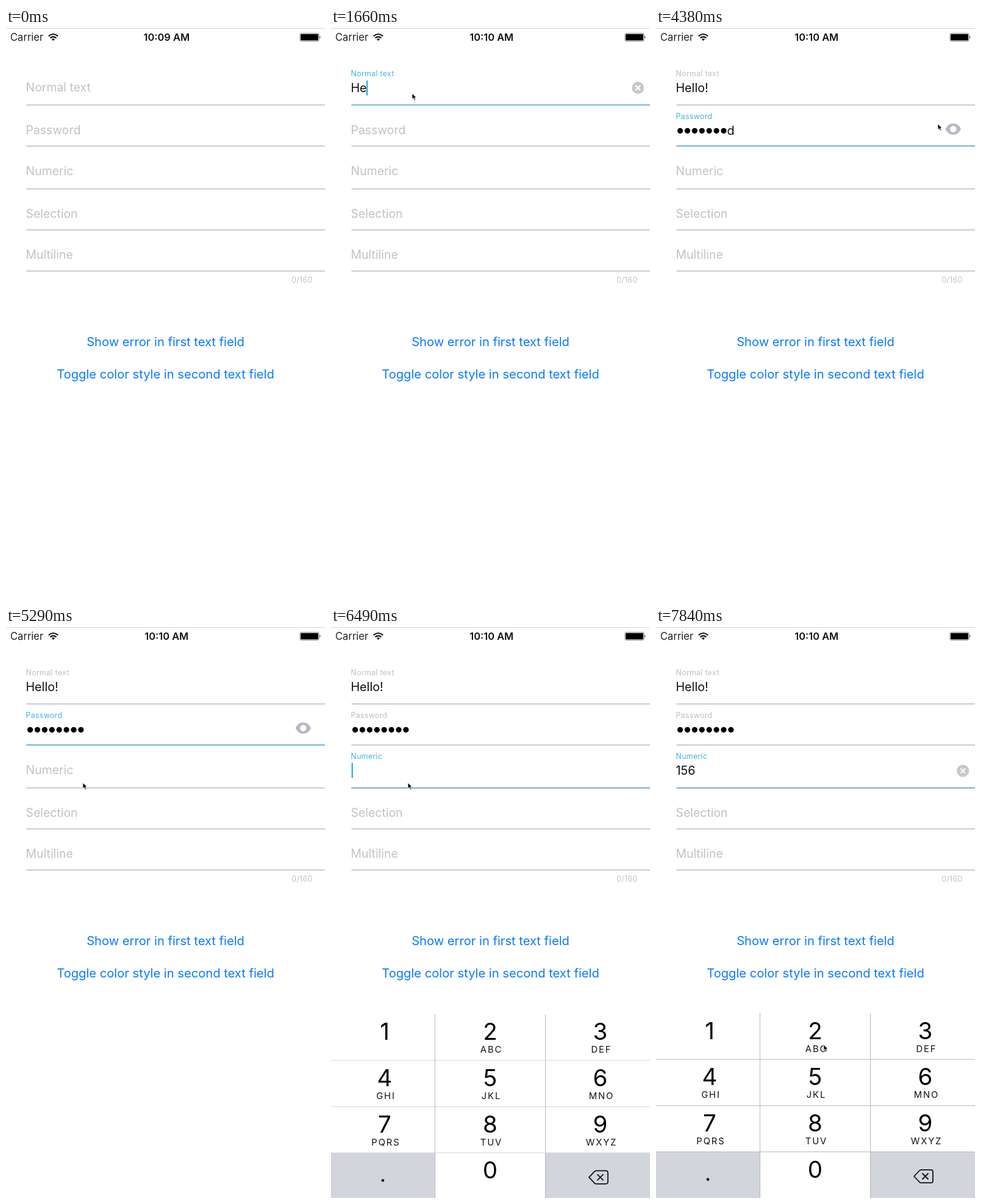
Recreate the animation shown at these times as an HTML page. Size 523 by 935 pixels, loop 7.99 s.

```html
<!DOCTYPE html>
<html lang="en">
<head>
<meta charset="utf-8">
<title>Animated text fields</title>
<style>
  html, body { margin: 0; width: 100%; height: 100%; overflow: hidden; background: #fff; }
  svg { display: block; width: 523px; height: 935px; }
  text { font-family: Inter, Roboto, sans-serif; white-space: pre; }
</style>
</head>
<body>
<svg id="stage" viewBox="0 0 523 935"></svg>
<script>
const LOOP = 7990, STEP = 150;
const GREY = '#c2c2c4', FLOAT_GREY = '#babfc6', RULE = '#b6b6b8';
const BLUE = '#42b3e5', LINK = '#0a7aff', ICON = '#c7c7cb';
const stage = document.getElementById('stage');

function add(tag, attrs, parent = stage) {
  const el = document.createElementNS('http://www.w3.org/2000/svg', tag);
  set(el, attrs);
  parent.appendChild(el);
  return el;
}
function set(el, attrs) {
  for (const k in attrs) el.setAttribute(k, attrs[k]);
}
function label(text, x, y, size, fill, extra = {}, parent = stage) {
  const el = add('text', { x, y, 'font-size': size, fill, ...extra }, parent);
  el.textContent = text;
  return el;
}
const show = (el, on) => set(el, { visibility: on ? 'visible' : 'hidden' });
const clamp = v => Math.max(0, Math.min(1, v));
const mix = (a, b, p) => a + (b - a) * p;
const easeOut = p => 1 - (1 - p) ** 2;
const within = (t, a, b) => t >= a && t < b;

function mixColor(a, b, p) {
  const part = (c, i) => parseInt(c.slice(i, i + 2), 16);
  return `rgb(${[1, 3, 5].map(i => Math.round(mix(part(a, i), part(b, i), p)))})`;
}

// Status bar
add('rect', { width: 523, height: 935, fill: '#fff' });
add('rect', { width: 523, height: 1, fill: '#d3d3d3' });
label('Carrier', 7, 21, 16.6, '#222');
const clock = label('', 263.3, 21, 16.4, '#111', { 'text-anchor': 'middle', 'font-weight': 600 });
const wifi = add('g', { fill: 'none', stroke: '#111', 'stroke-width': 2.1 });
add('path', { d: 'M69.8 13.4Q77.5 6.6 85.2 13.4' }, wifi);
add('path', { d: 'M72.6 16.4Q77.5 12.2 82.4 16.4' }, wifi);
add('path', { d: 'M77.5 21L74.8 18.3Q77.5 16.2 80.2 18.3Z', fill: '#111', stroke: 'none' }, wifi);
add('rect', { x: 482, y: 8.8, width: 31, height: 12.6, rx: 2, fill: '#fff', stroke: '#555', 'stroke-width': 0.8 });
add('rect', { x: 483.2, y: 10, width: 28.6, height: 10.2, rx: 1, fill: '#000' });
add('path', { d: 'M514.3 12.8Q516.6 15 514.3 17.4Z', fill: '#222' });

// Fields: focus and blur times in ms; those without a focus time stay idle
const fields = [
  { name: 'Normal text', rule: 126, base: 104, top: 78.5, focus: 910, blur: 2570, blue: '#48b5e7' },
  { name: 'Password', rule: 193.3, base: 174, top: 148.6, focus: 2570, blur: 5590, blue: '#459fd6' },
  { name: 'Numeric', rule: 263.5, base: 241, top: 215.8, focus: 5590, blur: Infinity, blue: '#5595c6' },
  { name: 'Selection', rule: 330.6, base: 311 },
  { name: 'Multiline', rule: 398, base: 378 }
];
for (const f of fields) {
  add('rect', { x: 33.5, y: f.rule - 0.7, width: 489.5, height: 1.4, fill: RULE });
  f.label = label(f.name, 32.6, f.base, 19.4, GREY);
  if (f.focus) {
    f.bar = add('rect', { x: 33.5, y: f.rule - 0.7, width: 0, height: 1.4, fill: f.blue });
    f.value = label('', 32.4, f.top + 26.6, 19.8, '#111');
  }
}
const [normal, password, numeric] = fields;

label('0/160', 502.5, 417.3, 12.4, GREY, { 'text-anchor': 'end', 'letter-spacing': 0.3 });
label('Show error in first text field', 261.5, 521, 20.15, LINK, { 'text-anchor': 'middle' });
label('Toggle color style in second text field', 261.5, 574, 20.15, LINK, { 'text-anchor': 'middle' });

const dots = Array.from({ length: 8 }, (_, i) =>
  add('circle', { cx: 39.6 + 11.9 * i, cy: 168.3, r: 4.6, fill: '#000' }));

const caret = add('rect', { width: 2.5, height: 24, fill: '#3aaee2' });

function clearButton(y) {
  const g = add('g', { transform: `translate(503.2 ${y})` });
  add('circle', { r: 10, fill: ICON }, g);
  add('path', { d: 'M-4 -4L4 4M4 -4L-4 4', stroke: '#fff', 'stroke-width': 2 }, g);
  return g;
}
const clearNormal = clearButton(98), clearNumeric = clearButton(235.5);

const eye = add('g', { transform: 'translate(487.3 165.5)' });
add('path', { d: 'M-12.7 0C-7 -12.4 7 -12.4 12.7 0C7 12.4 -7 12.4 -12.7 0Z', fill: '#b5b9c1' }, eye);
add('circle', { r: 5.2, fill: '#fff' }, eye);

// Number pad, drawn at its resting place and shifted down while it slides in
const pad = add('g', {});
const TOP = 632.3, ROW = 75.7, COLS = [0, 170.5, 351.5, 523], MIDS = [88, 261, 441.5];
const cell = (col, row, fill) => add('rect', {
  x: COLS[col], y: TOP + row * ROW, width: COLS[col + 1] - COLS[col], height: ROW + 0.5, fill
}, pad);
add('rect', { y: TOP, width: 523, height: 310, fill: '#fff' }, pad);
cell(0, 3, '#d2d5dc');
cell(2, 3, '#d2d5dc');
const pressed = cell(0, 0, '#d2d5dc');
for (const x of [COLS[1], COLS[2]])
  add('rect', { x: x - 0.5, y: TOP, width: 1, height: 310, fill: '#b3b5ba' }, pad);
const padRules = [1, 2, 3].map(i =>
  add('rect', { y: TOP + i * ROW - 0.5, width: 523, height: 1, fill: '#b3b5ba' }, pad));
const digit = (n, col, row) => label(n, MIDS[col], TOP + row * ROW + 42.2, 38.5, '#000',
  { 'text-anchor': 'middle' }, pad);
['', 'ABC', 'DEF', 'GHI', 'JKL', 'MNO', 'PQRS', 'TUV', 'WXYZ'].forEach((letters, i) => {
  const col = i % 3, row = Math.floor(i / 3);
  digit(i + 1, col, row);
  label(letters, MIDS[col] + 2, TOP + row * ROW + 63.4, 14.8, '#111',
    { 'text-anchor': 'middle', 'letter-spacing': 1.9 }, pad);
});
digit(0, 1, 3);
add('circle', { cx: 85, cy: 904.6, r: 2.3, fill: '#000' }, pad);
const erase = add('g', { fill: 'none', stroke: '#111', 'stroke-width': 1.8, 'stroke-linejoin': 'round' }, pad);
add('path', { d: 'M423 899.5L432 890Q433 888.8 435 888.8H450.5Q454 888.8 454 892.3V906.7Q454 910.2 450.5 910.2H435Q433 910.2 432 909Z' }, erase);
add('path', { d: 'M436.5 894.5L446.5 904.5M446.5 894.5L436.5 904.5' }, erase);

const pointer = add('path', {
  d: 'M0 0V9.6L2.2 7.6L3.9 11.4L5.6 10.6L4 7H7Z', fill: '#000', stroke: '#fff', 'stroke-width': 0.8
});

// Pointer path: time, x, y
const path = [
  [460, 300, 60], [760, 133, 107], [2270, 133, 107], [2570, 105, 169], [3930, 105, 169],
  [4230, 380, 150], [4380, 462, 157], [4530, 486, 164], [4840, 486, 164], [5290, 126, 255],
  [6490, 126, 255], [6790, 86, 670], [6940, 100, 675], [7240, 261, 745], [7390, 275, 745],
  [7540, 436, 745], [7840, 275, 684]
];
function pointerAt(t) {
  const i = path.findIndex(p => p[0] > t);
  if (i < 1) return path[path.length - 1].slice(1);
  const [a, b] = [path[i - 1], path[i]], p = (t - a[0]) / (b[0] - a[0]);
  return [mix(a[1], b[1], p), mix(a[2], b[2], p)];
}

// The screen refreshes in steps, with rests in between
const bursts = [[0, 0], [460, 1960], [2420, 3770], [4080, 4680], [4990, 7840]];
function held(t) {
  const [from, to] = bursts.filter(b => b[0] <= t).pop();
  return Math.min(to, from + Math.floor((t - from) / STEP) * STEP);
}

// Typing: [time, characters shown]
const typed = (keys, t) => keys.reduce((n, k) => t >= k[0] ? k[1] : n, 0);
const normalKeys = [[1510, 1], [1660, 2], [1810, 4], [1960, 6]];
const secretKeys = [[3320, 2], [3470, 4], [3620, 6], [3770, 8]];
const numberKeys = [[6790, 1], [7240, 2], [7540, 3]];
const presses = [[6790, 0, 0], [7240, 1, 1], [7540, 2, 1]];

function drawField(f, t) {
  const grow = easeOut(clamp((t - f.focus) / 300));
  const leave = clamp((t - f.blur) / 340);
  const idle = mixColor(GREY, BLUE, grow);
  set(f.label, {
    y: mix(f.base, f.top, grow),
    'font-size': mix(19.4, 12.4, grow),
    'letter-spacing': 0.3 * grow,
    fill: leave ? mixColor(BLUE, FLOAT_GREY, clamp(leave * 1.3)) : idle
  });
  set(f.bar, { width: 489.5 * grow * (1 - leave) });
  if (leave && leave < 1) set(f.bar, { width: Math.min(489.5, 455 * (1 - leave)) });
}

function drawCaret(t) {
  let f = null;
  if (within(t, 1060, 2570)) f = normal;
  else if (within(t, 2720, 4080)) f = password;
  else if (within(t, 5740, 7690)) f = numeric;
  show(caret, f);
  if (!f) return;
  let x = 33.6;
  if (f === password) {
    const n = typed(secretKeys, t);
    if (n) x = 34 + 11.9 * (n - 1) + f.value.getComputedTextLength();
  } else if (f.value.textContent) {
    x = 31.6 + f.value.getComputedTextLength();
  }
  set(caret, { x, y: f === normal ? 86 : f === password ? 154.5 : 222.5, height: f === password ? 22 : 24.5 });
}

function drawSecret(t) {
  const n = typed(secretKeys, t);
  const open = within(t, 4680, 4990);
  const lastPlain = n && t < 4530;
  const hidden = open ? 0 : lastPlain ? n - 1 : n;
  dots.forEach((d, i) => show(d, i < hidden));
  password.value.textContent = open ? 'password' : lastPlain ? 'password'[n - 1] : '';
  set(password.value, { x: open ? 32.4 : 33.2 + 11.9 * hidden });
}

function drawPad(t) {
  const k = Math.max(0, t - 5890) * 0.0122;
  const rest = t >= 6640 ? 0 : (1 + k) * Math.exp(-k);
  show(pad, t > 5890);
  set(pad, { transform: `translate(0 ${303 * rest})` });
  padRules.forEach(r => set(r, { fill: t < 6640 ? '#c9d6e5' : '#b3b5ba' }));
  const hit = presses.find(p => t === p[0]);
  set(pressed, { opacity: hit ? 1 : 0 });
  if (hit) {
    const [, col, row] = hit;
    set(pressed, { x: COLS[col], y: TOP + row * ROW, width: COLS[col + 1] - COLS[col] });
  }
}

function draw(now) {
  const t = held(now);
  clock.textContent = t < 460 ? '10:09 AM' : '10:10 AM';
  for (const f of [normal, password, numeric]) drawField(f, t);
  normal.value.textContent = 'Hello!'.slice(0, typed(normalKeys, t));
  numeric.value.textContent = '156'.slice(0, typed(numberKeys, t));
  drawSecret(t);
  drawCaret(t);
  show(clearNormal, within(t, 1510, 2570));
  show(clearNumeric, t >= 6790);
  show(eye, within(t, 2570, 5590));
  drawPad(t);
  show(pointer, t >= 460);
  set(pointer, { transform: `translate(${pointerAt(t)})` });
}

const start = performance.now();
function tick() {
  draw((performance.now() - start) % LOOP);
  requestAnimationFrame(tick);
}
tick();
</script>
</body>
</html>
```
